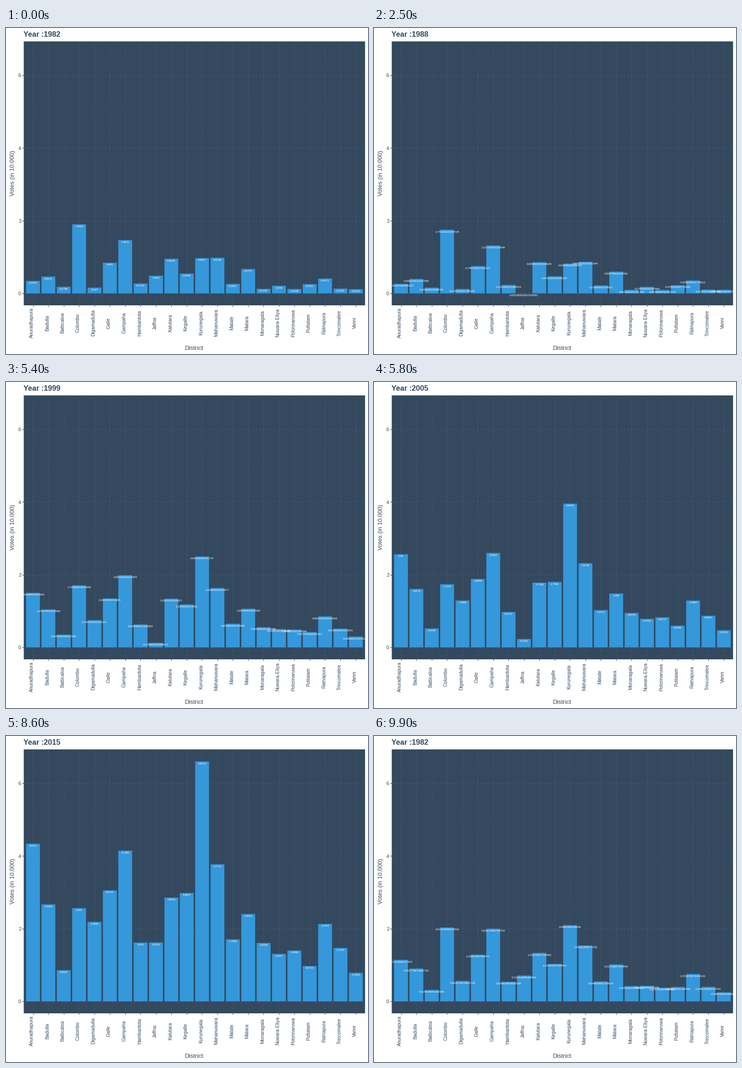
Animation, 789 px wide and 710 px high, one loop 10000 ms. Source, as a matplotlib script:

```python
import numpy as np
import matplotlib.pyplot as plt
from matplotlib.animation import FuncAnimation
from matplotlib.patches import Rectangle

W, H, DPI = 789, 710, 64
LEFT, RIGHT, TOP, BOTTOM = 38.7, 782.6, 29.2, 604.0
SLATE, BLUE, GRID, TICK = "#34495e", "#3498db", "#475d78", "#333333"

DISTRICTS = ("Anuradhapura Badulla Batticaloa Colombo Digamadulla Galle Gampaha "
             "Hambantota Jaffna Kalutara Kegalle Kurunegala Mahanuwara Matale "
             "Matara Monaragala Nuwara-Eliya Polonnaruwa Puttalam Ratnapura "
             "Trincomalee Vanni").split()
COUNT = len(DISTRICTS)

# Votes in units of 10,000 at the first and last election
FIRST = np.array([.3424, .4614, .1796, 1.9003, .157, .842, 1.4631, .2704, .484, .9529, .5446,
                  .9697, .9798, .2591, .6707, .1241, .209, .1198, .2531, .4073, .1302, .1142])
LAST = np.array([4.3371, 2.6683, .8562, 2.565, 2.1869, 3.0541, 4.1485, 1.616, 1.6191, 2.8541,
                 2.9807, 6.6014, 3.7714, 1.7069, 2.4032, 1.6059, 1.3047, 1.3996, .9723, 2.1302,
                 1.4703, .7854])

# Year: weight of first, weight of last, turnout in the far north
ELECTIONS = {
    1982: (1, 0, 1),
    1988: (.95, -.07, 0),
    1994: (.9, .21, .01),
    1999: (.57, .24, .15),
    2005: (.13, .58, .23),
    2010: (.05, .74, .37),
    2015: (0, 1, 1),
}
STARTS = [10, 25, 40, 54, 68, 82, 96]
FRAMES, STEPS = 100, 5


def votes(first, last, north):
    v = first * FIRST + last * LAST
    v[DISTRICTS.index("Jaffna")] *= north
    return np.maximum(v, 0).round(4)


YEARS = list(ELECTIONS)
VALUES = [votes(*weights) for weights in ELECTIONS.values()]

# Scales: 5% padding on the value axis, 0.6 units on the district axis
peak = LAST.max()
UNIT = (BOTTOM - TOP) / (peak * 1.1)
ZERO = BOTTOM - 0.05 * peak * UNIT
SLOT = (RIGHT - LEFT) / (COUNT + 0.2)
CENTRES = LEFT + SLOT * (np.arange(COUNT) + 0.6)
BAR = 0.9 * SLOT

plt.rcParams["font.family"] = "Liberation Sans"
fig = plt.figure(figsize=(W / DPI, H / DPI), dpi=DPI, facecolor="white")
ax = fig.add_axes([0, 0, 1, 1])
ax.set_xlim(0, W)
ax.set_ylim(H, 0)
ax.axis("off")


def pt(px):
    return px * 72 / DPI


def write(x, y, text, size, color=SLATE, **kw):
    kw = {"ha": "center", "va": "baseline", **kw}
    return ax.text(x, y, text, fontsize=pt(size), color=color, **kw)


def line(xs, ys, color, dashes=None):
    style = (0, dashes) if dashes else "-"
    ax.plot(xs, ys, color=color, lw=pt(1), ls=style, dash_capstyle="butt",
            solid_capstyle="butt", zorder=2)


def box(x, y, w, h, color, z):
    return ax.add_patch(Rectangle((x, y), w, h, fc=color, lw=0, zorder=z, snap=False))


panel = box(LEFT, TOP, RIGHT - LEFT, BOTTOM - TOP, SLATE, 1)

for value in (0, 2, 4, 6):
    y = ZERO - value * UNIT
    line([LEFT, RIGHT], [y, y], GRID, (4, 4))
    line([LEFT - 3.3, LEFT], [y, y], TICK)
    write(33, y + 4.4, str(value), 10.7, ha="right")

for x, name in zip(CENTRES, DISTRICTS):
    line([x, x], [BOTTOM, TOP], GRID, (4, 4))
    line([x, x], [BOTTOM, BOTTOM + 3.3], TICK)
    write(x + 0.6, 642.5, name, 10.4, rotation=90, rotation_mode="anchor")

write(410, 701, "District", 13.1)
write(18, 316.7, "Votes (in 10,000)", 13.1, rotation=90, rotation_mode="anchor")
title = write(38.5, 19, "", 16.2, ha="left", weight="bold")

bars = [box(x - BAR / 2, ZERO, BAR, 0, BLUE, 3) for x in CENTRES]
labels = [write(x, ZERO, "", 6, "white", zorder=4) for x in CENTRES]
for label in labels:
    label.set_clip_path(panel)


def state_at(frame):
    """Year shown and bar values, moving linearly between elections."""
    year, values = YEARS[0], VALUES[0]
    for k, start in enumerate(STARTS):
        if frame < start:
            break
        nxt = (k + 1) % len(YEARS)
        step = min(frame - start + 1, STEPS)
        # Single-precision progress gives the labels their long tails
        p = float(np.float32(step / STEPS))
        values = VALUES[k] + (VALUES[nxt] - VALUES[k]) * p
        year = YEARS[nxt] if p > 0.5 else YEARS[k]
    return year, values


def draw(frame):
    year, values = state_at(frame)
    title.set_text(f"Year :{year}")
    for bar, label, v in zip(bars, labels, values):
        bar.set_height(-v * UNIT)
        label.set_y(ZERO - v * UNIT + 6.2)
        label.set_text(f"{v:.15g}")
    return [title, *bars, *labels]


anim = FuncAnimation(fig, draw, frames=FRAMES, interval=100, repeat=True,
                     repeat_delay=0, blit=False)
plt.show()
```
